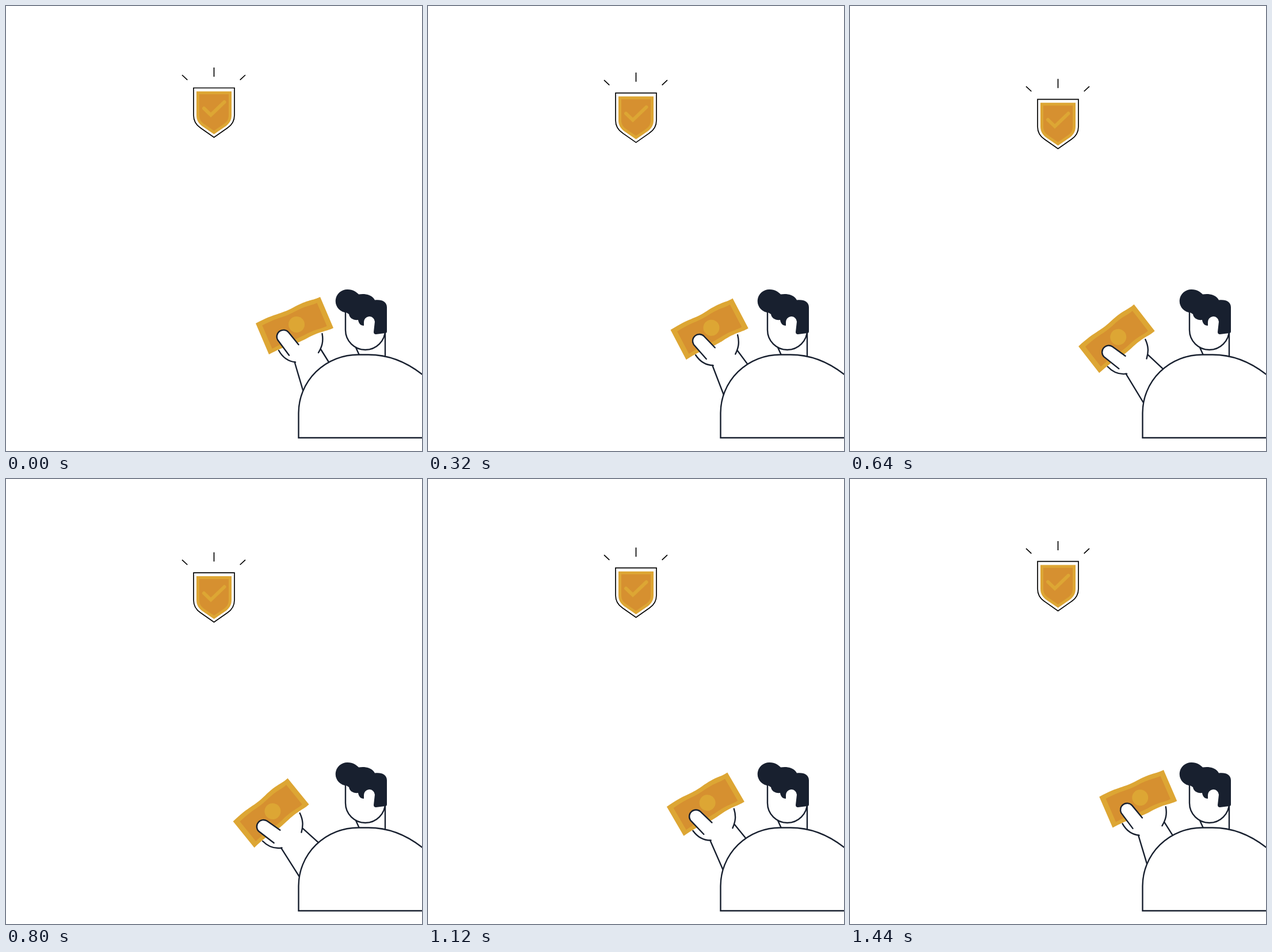
Write an HTML page that moves like this. It is 723 by 774 pixels and loops after 1480 ms.

```html
<!DOCTYPE html>
<html lang="en">
<head>
<meta charset="utf-8">
<title>Paying with a banknote</title>
<style>
  html, body { margin: 0; width: 100%; height: 100%; overflow: hidden; background: #fff; }
  svg { display: block; width: 100%; height: 100%; }
  .gold { fill: #dda634; }
  .amber { fill: #d69030; }
  .ink { fill: #18202f; }
  .white { fill: #fff; }
  .line { fill: none; stroke: #18202f; stroke-width: 2.4; stroke-linecap: round; }
  .thin { fill: none; stroke: #000; stroke-width: 1.7; }
</style>
</head>
<body>
<svg viewBox="0 0 723 774">
  <defs>
    <path id="note" d="M434 552c36-19 40-14 66-28s32-11 46-18l23 54c-14 7-20 4-46 18s-30 9-66 28z"/>
  </defs>

  <g id="shield">
    <path class="thin" d="M361.5 107V123M306 120l9.300 8.700M416 120l-9.300 8.700"/>
    <path class="thin" d="M326 142.500H397V190C397 201 391 208 385 212L361.500 228.500 338 212C332 208 326 201 326 190Z"/>
    <path class="gold" d="M331 148.500H392V190C392 200 387 205 382 209L361.500 223 341 209C336 205 331 200 331 190Z"/>
    <path class="amber" d="M336 153.500H387V190C387 198 383 202 379 205L361.500 217 344 205C340 202 336 198 336 190Z"/>
    <path d="M344 178l12 11.500 23.500-22.500" fill="none" stroke="#dda634" stroke-width="6" stroke-linecap="round"/>
  </g>

  <g id="arm">
    <path class="line" d="M549.500 570C552 584 549 593 543 603M547 597l30 48M474 599C480 610 489 618 503 619.500M501.500 619l30 102"/>
    <use href="#note" class="gold"/>
    <use href="#note" class="amber" transform="translate(501.500 556.500) rotate(-23) scale(.85 .75) rotate(23) translate(-501.500 -556.500)"/>
    <circle class="gold" cx="505" cy="554" r="14"/>
    <path class="line" style="fill:#fff" d="M492 607.500L472 580.500A11.600 11.600 0 0 1 491 567.500L508.500 589"/>
  </g>

  <path class="line" d="M659 566V608M608 594l5.500 12"/>
  <path class="line" style="fill:#fff" d="M590 532V563.500A34.500 34.500 0 0 0 659 563.500V532"/>
  <path class="ink" d="M594 493C603 493 608 497 613 501.500C622 500 636 501 641 511.500C653 510 662 514 662 524V566Q662 569 659 569L643 571Q639 571 639 567L641 549A9.500 9.500 0 0 0 622 550V556C616 556 613 552 612 546C604 547 597 543 596 536L592 533.500A20 20 0 0 1 594 493Z"/>

  <path id="body" class="white" d="M508.500 751V708A103.500 101.500 0 0 1 612 606.500H630C666 606.500 698 620 726 643V751Z"/>
  <path fill="#c7c7c7" d="M523.500 750V710C523.500 654 567 612.500 618 612.500H634C668 612.500 694 622 726 643V750Z"/>
  <use href="#body" style="fill:none;stroke:#18202f;stroke-width:2.4"/>
</svg>
<script>
  const LOOP = 1480, STEP = 40, SWING = 1520;
  const shield = document.getElementById('shield');
  const arm = document.getElementById('arm');
  const start = performance.now();

  function draw(now) {
    const elapsed = Math.max(0, now - start) % LOOP;
    const phase = Math.floor(elapsed / STEP) * STEP / SWING * 2 * Math.PI;
    const swing = (1 - Math.cos(phase)) / 2;
    const drop = 20.5 * (swing + 0.055 * Math.abs(Math.sin(phase / 2 * 2)) * 0 + 0.055 * Math.sqrt(4 * swing * (1 - swing)));
    const angle = 16.15 * swing * (0.6 + 0.4 * swing);
    shield.setAttribute('transform', `translate(0 ${drop})`);
    arm.setAttribute('transform', `rotate(${-angle} 569.5 714)`);
    requestAnimationFrame(draw);
  }
  draw(start);
</script>
</body>
</html>
```
